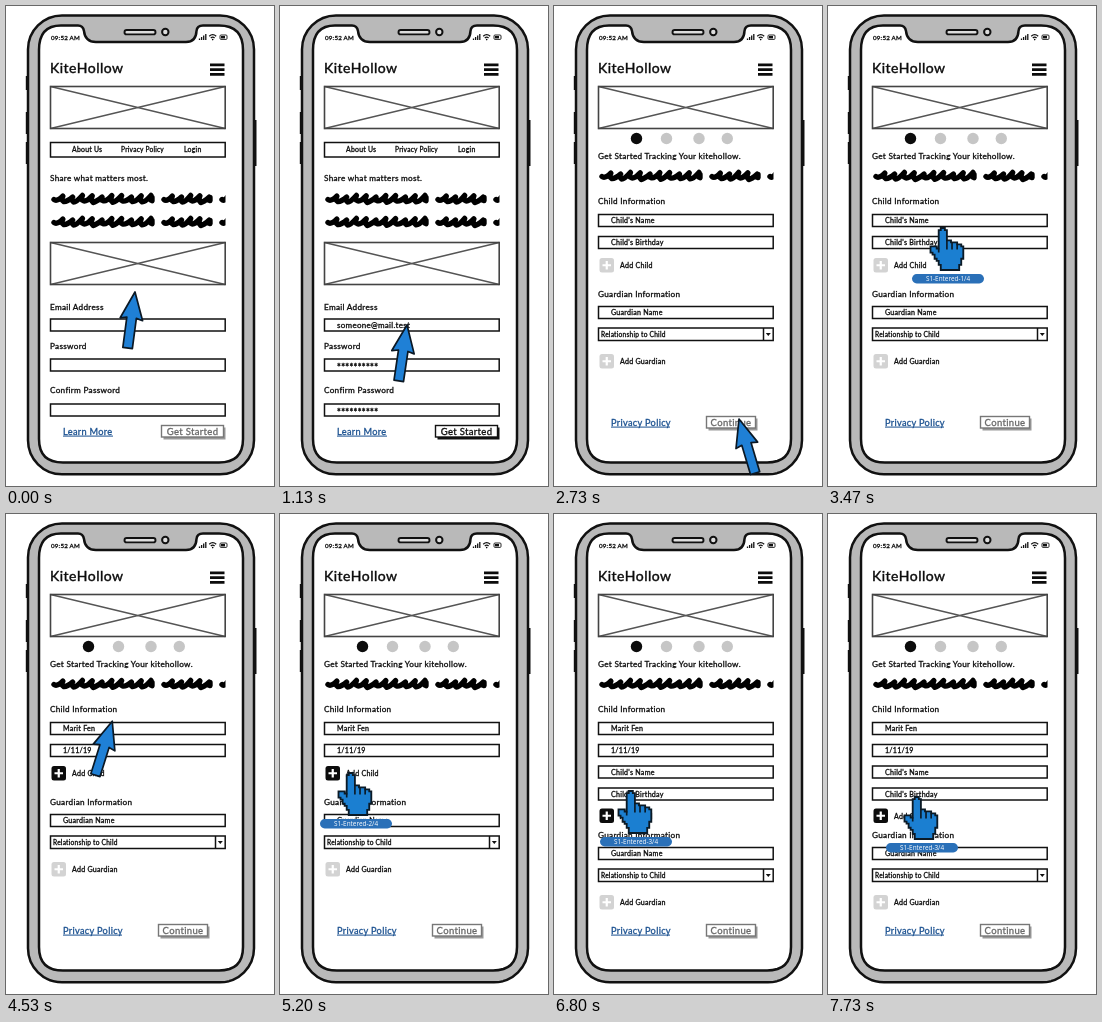
Animation of 268 by 480 pixels, one loop 8000 ms. Source, as an HTML page:

```html
<!DOCTYPE html>
<html lang="en">
<head>
<meta charset="utf-8">
<title>Phone wireframe walkthrough</title>
<style>
  html, body { margin: 0; width: 100%; height: 100%; overflow: hidden; background: #fff; }
  svg { display: block; width: 100%; height: 100%; }
  text { font-family: Lato, "Open Sans", sans-serif; letter-spacing: .035em; fill: #0c0c0c; stroke: #0c0c0c; stroke-width: .3px; white-space: pre; }
  .link { fill: #1b5190; stroke: #1b5190; }
  .dim { fill: #666; stroke: #666; }
  .tip { font-family: "Open Sans", "Noto Sans", sans-serif; letter-spacing: 0; fill: #fff; stroke: none; }
  .page { display: none; }
  .page.on { display: inline; }
</style>
</head>
<body>
<svg id="stage" viewBox="0 0 268 480"></svg>
<script>
const text = (x, y, size, str, extra = '') =>
  `<text x="${x}" y="${y}" font-size="${size}" ${extra}>${str}</text>`;
const path = (d, extra) => `<path d="${d}" ${extra}/>`;
const box = (x, y, w, h, extra) => `<rect x="${x}" y="${y}" width="${w}" height="${h}" ${extra}/>`;
const ink = 'fill="none" stroke="#111" stroke-width="1.5"';

const label = (y, str) => text(44, y, 8.2, str);
const field = (y, str = '', size = 7.1) =>
  box(44.5, y + .5, 174.7, 12, ink) + text(57, y + 9, size, str);

const picture = y =>
  path(`M44.5 ${y}L219.2 ${y + 42}M219.2 ${y}L44.5 ${y + 42}`, 'stroke="#555" stroke-width="1.3"') +
  box(44.5, y, 174.7, 42, 'fill="none" stroke="#444" stroke-width="1.6"');

function link(y, str, w) {
  return text(57, y, 9.2, str, 'class="link"') +
    path(`M57 ${y + 1.5}h${w}`, 'stroke="#1b5190" stroke-width="1"');
}

function button(x, y, w, str, live) {
  const edge = live ? '#111' : '#777';
  return box(x + 2, y + 2, w, 12, `fill="${live ? '#111' : '#999'}"`) +
    box(x, y, w, 11.5, `fill="#fff" stroke="${edge}" stroke-width="1.4"`) +
    text(x + w / 2, y + 9.2, 9.5, str, `text-anchor="middle" class="${live ? '' : 'dim'}"`);
}

// Thick slanted wave standing in for a word
function word(x0, x1, y) {
  const n = Math.max(1, Math.round((x1 - x0) / 10)), step = (x1 - x0 - 6) / n;
  let d = `M${x0 + 3} ${y + 6.5}`;
  for (let i = 0; i < n; i++) {
    const x = x0 + 3 + i * step;
    d += `Q${x + step * .3} ${y + 9} ${x + step * .9} ${y + 3.2 + Math.sin(i * 2)}` +
      `Q${x + step * .7} ${y + 7} ${x + step} ${y + 8.5 + Math.sin(i * 2.7)}`;
  }
  return d + `L${x1 - 3} ${y + 4.5}`;
}
const scribble = y =>
  path(word(45, 149, y) + word(155, 207, y) + word(213, 240, y),
    'clip-path="url(#lines)" fill="none" stroke="#000" stroke-width="5.4" stroke-linecap="round" stroke-linejoin="round"');

function addRow(y, str, live) {
  return box(45.5, y, 14.5, 14.5, `rx="2.5" fill="${live ? '#0c0c0c' : '#d3d3d3'}"`) +
    path(`M52.75 ${y + 3}v8.5M48.5 ${y + 7.25}h8.5`, 'stroke="#fff" stroke-width="2.2"') +
    text(66, y + 10, 7.1, str);
}

function landing(filled) {
  const stars = filled ? '**********' : '';
  return picture(80.5) + box(44.5, 136.5, 174.7, 14.5, ink) +
    text(66, 145.6, 6.9, 'About Us') + text(115, 145.6, 6.6, 'Privacy Policy') + text(178, 145.6, 6.9, 'Login') +
    label(175, 'Share what matters most.') + scribble(187) + scribble(210) + picture(236.5) +
    label(304, 'Email Address') + field(312.5, filled ? 'someone@mail.test' : '', 8) +
    label(343, 'Password') + field(352.5) + text(57, 364.4, 9, stars, 'font-weight="700"') +
    label(387, 'Confirm Password') + field(397.5) + text(57, 409.4, 9, stars, 'font-weight="700"') +
    link(428.6, 'Learn More', 50) + button(155.5, 419.5, 62, 'Get Started', filled);
}

function signup(entered, extra) {
  const dy = extra ? 33 : 0;
  const dots = [82.5, 112.5, 145, 173.3].map((x, i) =>
    `<circle cx="${x}" cy="132.5" r="5.7" fill="${i ? '#c6c6c6' : '#0c0c0c'}"/>`).join('');
  return picture(80.5) + dots + label(153, 'Get Started Tracking Your kitehollow.') + scribble(164) +
    label(198, 'Child Information') +
    field(208, entered ? 'Marit Fen' : 'Child\'s Name') +
    field(230, entered ? '1/11/19' : 'Child\'s Birthday') +
    (extra ? field(251.5, 'Child\'s Name') + field(273.5, 'Child\'s Birthday') : '') +
    addRow(extra ? 294.5 : 252, 'Add Child', entered) +
    label(291 + dy, 'Guardian Information') + field(300 + dy, 'Guardian Name') +
    box(44.5, 322 + dy, 174.7, 12.5, ink) + text(47, 330.6 + dy, 6.6, 'Relationship to Child') +
    path(`M209.5 ${322 + dy}v12.5`, ink) + path(`M211.8 ${327 + dy}h5l-2.5 3z`, 'fill="#111"') +
    addRow(348 + dy, 'Add Guardian', false) +
    link(419.6, 'Privacy Policy', 59) + button(152.5, 410.5, 49, 'Continue', false);
}

const phone =
  path('M21 70v14M21 106v22M21 136v22', 'stroke="#111" stroke-width="2.4"') +
  path('M248.8 114v46', 'stroke="#111" stroke-width="3.4"') +
  box(22, 9.5, 226, 458.8, 'rx="34" fill="#b9b9b9" stroke="#111" stroke-width="2.5"') +
  path('M55 19.5H72Q77 19.5 78 25Q79 36 90 36H180Q190 36 190.5 25Q191 19.5 197 19.5H213Q237 19.5 237 44V433Q237 456.5 213 456.5H57Q33 456.5 33 433V44Q33 19.5 55 19.5Z',
    'fill="#fff" stroke="#111" stroke-width="2.5"') +
  box(118.5, 24, 31, 4.4, 'rx="2.2" fill="#ddd" stroke="#111" stroke-width="1.9"') +
  '<circle cx="159.3" cy="26" r="3.2" fill="#ddd" stroke="#111" stroke-width="2"/>' +
  text(45, 34, 6.2, '09:52 AM') +
  path('M193.5 34v-1.5M195.6 34v-3M197.7 34v-4.5M199.8 34v-6', 'stroke="#111" stroke-width="1.3"') +
  path('M203.2 30.2q3.5-3 7 0M204.8 32q1.9-1.6 3.8 0', 'fill="none" stroke="#111" stroke-width="1.3"') +
  '<circle cx="206.7" cy="33.6" r=".8"/>' +
  box(214, 29, 7, 4.4, 'rx="1" fill="none" stroke="#111" stroke-width=".9"') +
  box(215, 30, 4, 2.4, 'fill="#111"') +
  text(44, 67, 14, 'KiteHollow', 'style="stroke-width:.4px"') +
  path('M204 58.8h14.5M204 63.6h14.5M204 68.4h14.5', 'stroke="#0c0c0c" stroke-width="2.7"');

const pages = [landing(false), landing(true), signup(false, false), signup(true, false), signup(true, true)];

const cursor =
  '<g id="arrow">' +
  path('M0 0L11.3 27.5L4.8 26V56.5H-4.8V26L-11.3 27.5Z', 'fill="#1f80d6" stroke="#0b1824" stroke-width="1.7" stroke-linejoin="round"') +
  '</g><g id="hand"><g transform="translate(-10.5 0) scale(2.05)">' +
  path('M5 0H7V1H8V6H10V7H13V8H15V9H16V15H15V18H14V20.5H5V18H4V16H3V15H2V13H1V12H0V9H3V10H4V1H5Z',
    'fill="#1b7fd1" stroke="#0b1a26" stroke-width=".9"') +
  path('M8 6V10.5M10.5 7V10.5M13 8V10.5M4 10V12', 'stroke="#0b1a26" stroke-width=".8"') +
  '</g>' + box(-29, 46, 72, 9.4, 'rx="4.7" fill="#2a70b8"') +
  '<text id="tip" class="tip" x="7" y="53.1" font-size="6.4" text-anchor="middle"></text></g>';

const stage = document.getElementById('stage');
stage.innerHTML = '<clipPath id="lines"><rect x="44" y="150" width="175.5" height="90"/></clipPath>' + phone +
  pages.map(p => `<g class="page">${p}</g>`).join('') + cursor;

const pageEls = stage.querySelectorAll('.page');
const [arrow, hand, tip] = ['arrow', 'hand', 'tip'].map(id => document.getElementById(id));

// Clickable area of each page (left, top, right, bottom) and its hover label
const hot = [
  [44, 306, 219, 410, 'S1-Entered-0/4'],
  [155, 419, 219, 434, 'S1-Get Started'],
  [44, 207, 219, 244, 'S1-Entered-1/4'],
  [44, 252, 100, 267, 'S1-Entered-2/4'],
  [44, 251, 219, 287, 'S1-Entered-3/4']
];
const FPS = 15, LOOP = 8000;
const turns = [0, 17, 36, 68, 93];   // tick at which each page opens
const route = [                      // tick, x, y
  [0, 129, 286], [1, 131, 311], [2, 129, 318], [6, 129, 318], [11, 127, 319], [17, 127, 319],
  [21, 158, 365], [25, 187, 408], [27, 189, 417], [29, 187, 421], [30, 187, 421], [32, 188, 421],
  [38, 188, 421], [41, 185, 413], [44, 168, 329], [45, 168, 329], [49, 87, 184], [50, 88, 183],
  [51, 88, 183], [52, 113, 222], [57, 108, 215], [63, 111, 217], [67, 111, 217], [71, 92, 178],
  [75, 49, 228], [78, 69, 259], [80, 63, 265], [82, 62, 265], [96, 62, 265], [99, 43, 261],
  [102, 75, 277], [106, 72, 282], [109, 63, 284], [116, 87, 283], [120, 87, 283]
];

function place(tick) {
  const i = route.findIndex(k => k[0] > tick);
  const [t0, x0, y0] = route[i - 1], [t1, x1, y1] = route[i];
  const u = (tick - t0) / (t1 - t0);
  return [x0 + (x1 - x0) * u, y0 + (y1 - y0) * u];
}

function draw(ms) {
  const tick = Math.min(119, Math.floor((ms % LOOP + 5) * FPS / 1000));
  const page = turns.filter(t => t <= tick).length - 1;
  pageEls.forEach((el, i) => el.classList.toggle('on', i === page));

  const [x, y] = place(tick);
  const [l, t, r, b, name] = hot[page];
  const over = x >= l && x <= r && y >= t && y <= b;
  hand.style.display = over ? 'inline' : 'none';
  arrow.style.display = over ? 'none' : 'inline';
  hand.setAttribute('transform', `translate(${x} ${y})`);
  // The arrow leans with its distance from the middle
  arrow.setAttribute('transform', `translate(${x} ${y}) rotate(${(146.5 - x) * .43})`);
  tip.textContent = name;
}

const start = performance.now();
function loop() {
  draw(performance.now() - start);
  requestAnimationFrame(loop);
}
loop();
</script>
</body>
</html>
```
